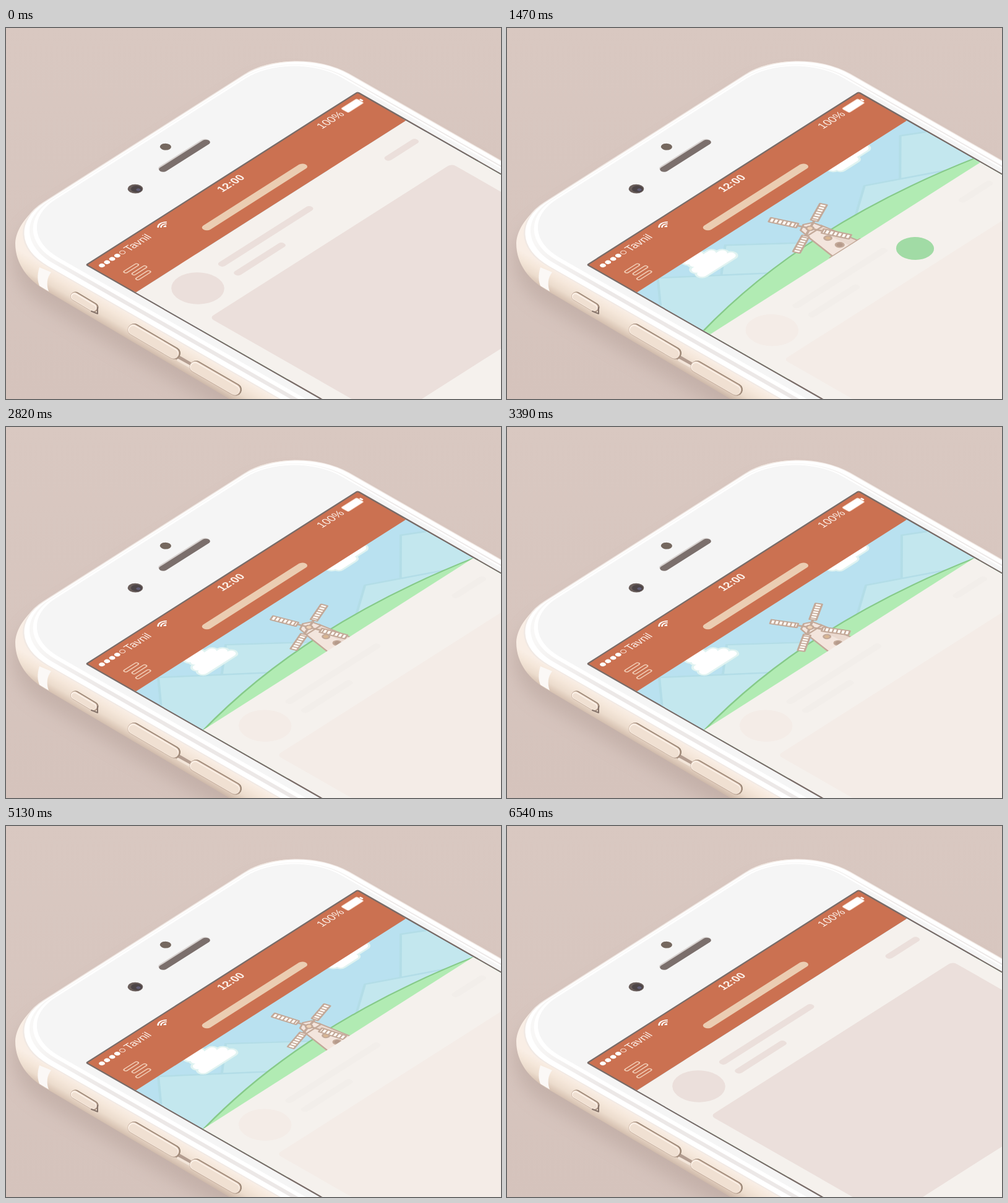
These frames come from a looping animation (800x600 px, 6.93 s). An HTML page:

```html
<!DOCTYPE html>
<html lang="en">
<head>
<meta charset="utf-8">
<title>Pull to refresh</title>
<style>
html, body { margin: 0; width: 100%; height: 100%; overflow: hidden; background: #d8c7c0; }
svg { display: block; width: 800px; height: 600px; }
text { font-family: "Liberation Sans", Arial, sans-serif; fill: #fdf1ea; }
</style>
</head>
<body>
<svg id="stage" viewBox="0 0 800 600" xmlns="http://www.w3.org/2000/svg"></svg>
<script>
const LOOP = 6930;
const REST = 87, FULL = 108;
const PLANE = 'matrix(1.168 -.744 1.25 .715 130 383)';

// ---- markup helpers
const rect = (x, y, w, h, r, fill, extra = '') =>
  `<rect x="${x}" y="${y}" width="${w}" height="${h}" rx="${r}" fill="${fill}" ${extra}/>`;
const disc = (x, y, r, fill, extra = '') =>
  `<circle cx="${x}" cy="${y}" r="${r}" fill="${fill}" ${extra}/>`;
const path = (d, fill, extra = '') => `<path d="${d}" fill="${fill}" ${extra}/>`;
const line = (d, color, width, extra = '') =>
  path(d, 'none', `stroke="${color}" stroke-width="${width}" stroke-linecap="round" stroke-linejoin="round" ${extra}`);
const face = (x1, x2, y, r, fill) => rect(x1, y, x2 - x1, 900, r, fill);

// ---- phone body
const button = (x1, y1, x2, y2, w) => {
  const d = `M${x1} ${y1}L${x2} ${y2}`;
  return line(d, '#94806f', w + 1.6, 'transform="translate(1.2 -.2)"') +
    line(d, '#c3aa9a', w + .8) +
    line(d, '#fbf0e6', w - 1, 'transform="translate(-.4 0)"') +
    line(d, '#f0e0d2', w - 4, 'transform="translate(-.4 1)"');
};

const shell = 'M395 69L62 282C34 300 16 325 15 348C15 384 38 408 62 423L390 617L800 617V216L545 74C500 48 440 48 395 69Z';

const body = `
  ${path(shell, '#a48e86', 'opacity=".34" filter="url(#soft)" transform="translate(-4 24)"')}
  ${path(shell, 'url(#side)')}
  ${path('M54 387C50 400 51 409 54 417L69 426C65 415 66 404 73 395Z', '#fbf8f6')}
  ${button(111, 434, 141, 452, 13)}
  ${line('M148 452V462L138 458', '#85736a', 2)}
  ${line('M276 532L300 546', '#b39d90', 8)}
  ${line('M278 537L298 548', '#f3e6da', 4)}
  ${button(206, 488, 271, 526, 18)}
  ${button(306, 548, 370, 585, 18)}`;

const glass = [
  face(-28, 391, -96.5, 71, '#f1e9e4'),
  face(-26.5, 390, -95.3, 70, '#ffffff'),
  face(-20, 385, -94, 69, 'url(#rim)'),
  face(-15, 383.5, -93, 67, '#ffffff'),
  face(-10, 381.5, -91, 64, '#f5f5f5'),
  rect(156, -55.5, 67, 9.5, 4.7, '#d6d1cf'),
  rect(155.5, -53.8, 67, 8, 4, '#7b6f6c'),
  disc(187, -72.4, 5.3, '#75685f'),
  disc(119, -48, 7.2, '#6a5e5b'),
  disc(119.5, -47, 5.2, '#4d4547'),
  disc(120, -45, 2, '#625e78')
].join('');

// ---- scenery
const peak = (x, y, left, right) => {
  const d = `M${x - 80} ${y + 80 * left}L${x} ${y}L${x + 80} ${y + 80 * right}`;
  return path(d + 'V220H' + (x - 80) + 'Z', '#c3e7ee') + line(d, '#b3dde7', 2.4);
};

const cloud = (id, bars) => {
  const layer = (grow, fill) => bars.map(([x1, x2, y, h]) =>
    rect(x1 - grow, y - h / 2 - grow, x2 - x1 + 2 * grow, h + 2 * grow, h / 2 + grow, fill)).join('');
  return `<g id="${id}">${layer(2.2, '#e0f3f1')}${layer(0, '#ffffff')}</g>`;
};

const INK = '#c3a999';
const inked = `stroke="${INK}" stroke-width="1.8" stroke-linejoin="round"`;

const blade = angle => {
  let ticks = '';
  for (let y = -34; y < -14; y += 3.9) ticks += `M-3.3 ${y}H3.3`;
  return `<g transform="rotate(${angle})">
    ${line('M0 0V-13', INK, 2.4)}
    ${rect(-3.3, -38, 6.6, 26, .4, '#fffaf5', inked)}
    ${path(ticks, 'none', `stroke="${INK}" stroke-width="1.5"`)}</g>`;
};

const mill = `<g id="mill">
  ${path('M-10 4L-16.5 44H16.5L10 4Z', '#f3e5dd', inked)}
  ${path('M3 5H9L15.5 43H6Z', '#ead9cf')}
  ${disc(.5, 21.5, 3.2, '#d9b692', inked)}
  ${disc(.5, 36, 3.6, '#b59a8b', inked)}
  ${rect(-20, 43, 40, 7, 1, '#ecdbd1', inked)}
  ${path('M-10 6L-8 -4L0 -8L8 -4L10 6Z', '#f3e5dd', inked)}
  <g id="rotor">${[0, 90, 180, 270].map(blade).join('')}${disc(0, 0, 3.2, '#efd3b8', inked)}</g>
</g>`;

const scene = `
  ${rect(0, 60, 375, 200, 0, '#b9e1f0')}
  <g id="peaks">
    ${peak(113, 74.4, .8, .94)}
    ${peak(31.4, 63.5, 1.05, .9)}
    ${peak(353, 76.5, .93, .63)}
    ${peak(272.3, 105.6, .65, .55)}
  </g>
  ${cloud('cloudA', [[68, 91, 65.5, 8], [69, 101, 72, 8], [64, 108, 79.5, 9], [63, 111, 87.5, 9]])}
  ${cloud('cloudB', [[267, 318, 63, 10], [272, 299, 68.5, 8]])}
  <g id="hill">
    ${path('M-3 151.5Q187.5 106.5 378 151.5V260H-3Z', '#b1ebb3', 'stroke="#86ca89" stroke-width="1.8"')}
    ${rect(36, 169.5, 36, 5, 2.5, '#85cb88')}
    ${line('M314 167A3 3 0 1 0 312 173', '#85cb88', 3)}
  </g>
  ${path('M0 0Q-24 -2 -34 0Q-24 2 0 0Z', '#ffffff', 'id="gust"')}
  ${mill}`;

// ---- sliding panel and fixed header
const panel = `<g id="panel">
  ${rect(0, 63.3, 375, 700, 0, '#f5f1ed')}
  <g id="items">
    ${disc(46, 101, 25, 'inherit', 'class="big"')}
    ${rect(20, 140.5, 335, 231.5, 5, 'inherit', 'class="big"')}
    ${rect(86, 87.7, 128, 7.8, 3.9, 'inherit', 'class="bar"')}
    ${rect(86, 108, 68, 7.8, 3.9, 'inherit', 'class="bar"')}
    ${rect(316, 87.7, 44, 7.8, 3.9, 'inherit', 'class="bar"')}
  </g>
  ${disc(233.2, 111, 17.9, '#a1dba5', 'id="touch"')}
</g>`;

const arc = r => `M${95.5 - r * .72} ${14 - r * .7}A${r} ${r} 0 0 1 ${95.5 + r * .72} ${14 - r * .7}`;
const menu = [[16, 34.2], [19, 42], [16, 49.8]].map(([x, y]) =>
  rect(x, y - 1.8, 18.5, 3.6, 1.8, 'none', 'stroke="#f1cdb6" stroke-width="1.2"')).join('');

const header = `
  ${rect(0, 0, 375, 63.2, 0, '#cb7151')}
  ${[0, 1, 2, 3].map(i => disc(9.4 + 7.1 * i, 11.2, 2.9, '#ffffff')).join('')}
  ${disc(37.8, 11.2, 2.6, 'none', 'stroke="#fbe3d6" stroke-width=".8"')}
  <text x="43" y="15.3" font-size="12.4">Tavnil</text>
  ${line(arc(7.8) + arc(5), '#ffffff', 1.5)}
  ${path(arc(2.8) + 'L95.5 14Z', '#ffffff')}
  <text x="187.8" y="15.3" font-size="12.5" font-weight="700" text-anchor="middle">12:00</text>
  <text x="325.5" y="15.4" font-size="12.5" text-anchor="middle">100%</text>
  ${rect(345.5, 6.2, 21.6, 9.4, 1.8, '#ffffff', 'stroke="#f3cfbd" stroke-width=".7"')}
  ${rect(367.7, 8.8, 2, 4.2, 1, '#ffffff')}
  ${menu}
  ${rect(117, 37.5, 141.5, 9.1, 4.5, '#ebcdb2')}`;

document.getElementById('stage').innerHTML = `
  <defs>
    <linearGradient id="back" x2="0" y2="1">
      <stop stop-color="#d9c8c1"/><stop offset="1" stop-color="#d5c3bc"/>
    </linearGradient>
    <linearGradient id="side" gradientUnits="userSpaceOnUse" x1="200" y1="462" x2="181" y2="495">
      <stop stop-color="#f9eee5"/><stop offset=".3" stop-color="#f5e7da"/>
      <stop offset=".62" stop-color="#ecdccd"/><stop offset=".85" stop-color="#dcc8b8"/>
      <stop offset="1" stop-color="#cfbaab"/>
    </linearGradient>
    <linearGradient id="rim" gradientUnits="userSpaceOnUse" x1="0" y1="-60" x2="0" y2="40">
      <stop stop-color="#f8f7f6"/><stop offset="1" stop-color="#ece8e7"/>
    </linearGradient>
    <filter id="soft" x="-20%" y="-20%" width="140%" height="140%"><feGaussianBlur stdDeviation="14"/></filter>
    <clipPath id="screen">${rect(.9, .9, 373.3, 700, 1, '#000')}</clipPath>
  </defs>
  <rect width="800" height="600" fill="url(#back)"/>
  ${body}
  <g transform="${PLANE}">
    ${glass}
    ${rect(-.9, -.9, 377, 720, 2.5, '#786b67')}
    <g clip-path="url(#screen)">${scene}${panel}${header}</g>
  </g>`;

// ---- motion
const $ = id => document.getElementById(id);
const bigs = document.querySelectorAll('.big'), bars = document.querySelectorAll('.bar');
const clamp = v => Math.min(1, Math.max(0, v));
const span = (t, a, b) => clamp((t - a) / (b - a));
const quadInOut = p => p < .5 ? 2 * p * p : 1 - 2 * (1 - p) ** 2;
const cubicInOut = p => p < .5 ? 4 * p ** 3 : 1 - 4 * (1 - p) ** 3;
const mix = (a, b, p) => a + (b - a) * p;
const tint = (a, b, p) => `rgb(${a.map((v, i) => mix(v, b[i], p).toFixed(1))})`;
const track = (t, keys) => {
  const i = keys.findIndex(k => k[0] > t);
  if (i < 0) return keys[keys.length - 1][1];
  if (i === 0) return keys[0][1];
  const [a, b] = [keys[i - 1], keys[i]];
  return mix(a[1], b[1], (t - a[0]) / (b[0] - a[0]));
};

const offset = t => {
  if (t < 2250) return FULL * quadInOut(span(t, 475, 1800));
  if (t < 5630) return mix(REST, FULL, (1 - span(t, 2250, 2850)) ** 2);
  return REST * (1 - cubicInOut(span(t, 5630, 6500)));
};

// slow turn while dragged, then a spin that dies away
const turn = t => t < 2235
  ? 48 + (t - 960) * .0345
  : 74.3 - 32.7 * Math.max(0, 5.37 - t / 1000) ** 3.17;

const move = (id, value) => $(id).setAttribute('transform', value);
const scaleAt = (x, y, k, dx = 0) =>
  `translate(${x + dx} ${y}) scale(${k}) translate(${-x} ${-y})`;

function draw(t) {
  const y = offset(t);
  const stretch = Math.max(0, (y - REST) / (FULL - REST));
  const fade = clamp(y / REST);

  move('panel', `translate(0 ${y})`);
  const big = tint([235, 223, 219], [244, 236, 231], fade);
  const bar = tint([235, 223, 219], [242, 238, 234], fade);
  bigs.forEach(e => e.setAttribute('fill', big));
  bars.forEach(e => e.setAttribute('fill', bar));
  $('touch').setAttribute('opacity', span(t, 390, 560) * (1 - span(t, 2250, 2400)));

  move('peaks', `translate(${-stretch} ${-4.3 * stretch})`);
  move('hill', `translate(0 ${-3 * stretch})`);
  move('cloudA', scaleAt(86, 80, 1 + .07 * stretch,
    track(t, [[390, -6], [960, -4], [2220, 0], [3390, 0], [4170, 1.7], [4690, .2]])));
  move('cloudB', scaleAt(292, 64, 1 + .07 * stretch,
    track(t, [[390, 1], [960, 1], [2220, 0], [3390, -1], [4170, .8], [4690, 2]])));

  move('mill', `translate(187.5 112.5) scale(${1 + .15 * stretch})`);
  move('rotor', `rotate(${turn(t) % 90})`);

  const g = span(t, 3400, 4650);
  move('gust', `translate(${mix(50, 355, g)} 120.5)`);
  $('gust').setAttribute('opacity', Math.min(1, g * 8, (1 - g) * 5));
}

const start = performance.now();
function tick() {
  draw((performance.now() - start) % LOOP);
  requestAnimationFrame(tick);
}
draw(0);
requestAnimationFrame(tick);
</script>
</body>
</html>
```
